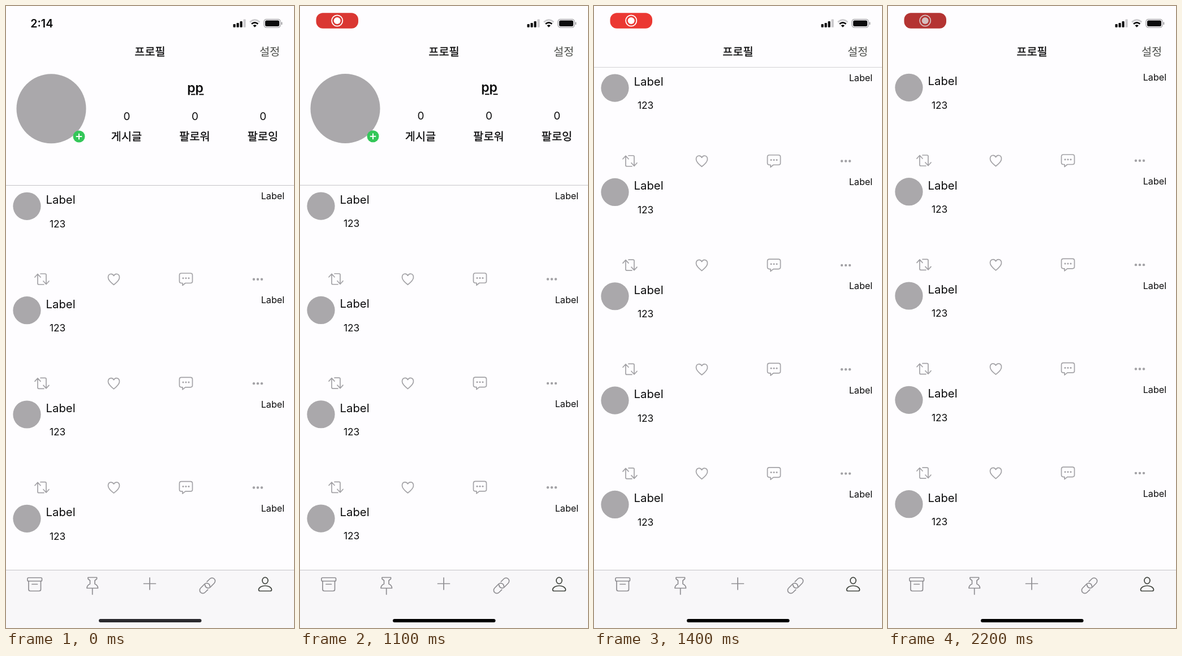
An HTML page for the animation above (2300 ms loop, 509 by 1101 pixels).

```html
<!DOCTYPE html>
<html lang="ko">
<head>
<meta charset="utf-8">
<title>프로필</title>
<style>
html, body { margin: 0; width: 100%; height: 100%; overflow: hidden; background: #fefdff; }
svg { display: block; width: 100vw; height: 100vh; }
text { font-family: Inter, "Liberation Sans", sans-serif; fill: #0c0c0d; }
.ko { font-family: "Noto Sans CJK KR", "Noto Sans CJK", sans-serif; font-size: 19.7px; font-weight: 500; stroke: #0c0c0d; stroke-width: .3; }
.light { font-weight: 400; fill: #4a4c48; stroke: none; }
.mid { text-anchor: middle; }
.line { fill: none; stroke-width: 1.7; stroke-linecap: round; stroke-linejoin: round; }
</style>
</head>
<body>
<svg viewBox="0 0 509 1101">
  <defs>
    <g id="row">
      <circle cx="37" cy="354.3" r="24.6" fill="#aaa8ab"/>
      <text x="70.6" y="350.3" font-size="20.3">Label</text>
      <text x="77" y="391.7" font-size="17.3">123</text>
      <text x="492.2" y="342" font-size="16.2" text-anchor="end">Label</text>
      <g class="line" stroke="#a3a2a6">
        <path d="M51 480l5-5.5 5 5.5M56 475v16q0 2 2 2h9M61 474h8q2 0 2 2v16M66 487l5 5.500 5-5.500"/>
        <path d="M190.500 493.500C184 488.500 180.500 485 180.500 480.500C180.500 473.500 188 472.500 190.500 477.500C193 472.500 200.500 473.500 200.500 480.500C200.500 485 197 488.500 190.500 493.500z"/>
        <path d="M310 473h16q3.500 0 3.500 3.500v10.500q0 3.500-3.500 3.500h-9l-5 4v-4h-2q-3.500 0-3.500-3.500v-10.500q0-3.500 3.500-3.500z"/>
      </g>
      <g fill="#a3a2a6">
        <circle cx="313" cy="481.700" r="1.500"/><circle cx="318" cy="481.700" r="1.500"/><circle cx="323" cy="481.700" r="1.500"/>
        <circle cx="438" cy="483.800" r="2.200"/><circle cx="445" cy="483.800" r="2.200"/><circle cx="452" cy="483.800" r="2.200"/>
      </g>
    </g>
  </defs>

  <rect width="509" height="1101" fill="#fefdff"/>
  <g id="page">
    <circle cx="80" cy="181.800" r="61.500" fill="#aaa8ab"/>
    <circle cx="129" cy="231" r="10.500" fill="#34c759"/>
    <path d="M123.800 231h10.400M129 225.800v10.400" stroke="#fff" stroke-width="2"/>
    <text class="mid" x="334.500" y="152.500" font-size="23" font-weight="600">pp</text>
    <path d="M327 156.500h7.500M341.500 156.500h8" stroke="#0c0c0d" stroke-width="1.800"/>
    <g class="mid" font-size="19">
      <text x="213.500" y="201.500">0</text><text x="334" y="201.500">0</text><text x="454.300" y="201.500">0</text>
      <text class="ko" x="213" y="238">게시글</text><text class="ko" x="333.500" y="238">팔로워</text><text class="ko" x="454" y="238">팔로잉</text>
    </g>
    <path d="M0 317.500h509" stroke="#c4c3c6"/>
    <g id="rows"></g>
  </g>

  <rect width="509" height="108" fill="#fefdff"/>
  <text class="ko mid" x="254.500" y="87.700">프로필</text>
  <text class="ko light mid" x="466" y="87.700">설정</text>

  <text id="clock" class="mid" x="63.300" y="37.500" font-size="19.700" font-weight="600"></text>
  <g id="pill">
    <rect id="pillBg" x="28.500" y="12.300" width="74.500" height="27.400" rx="12"/>
    <circle id="ring" cx="65.700" cy="26" r="9.600" fill="none" stroke-width="1.800"/>
    <circle id="dot" cx="65.700" cy="26" r="6"/>
  </g>

  <g fill="#0c0c0d">
    <rect x="401.500" y="32" width="4.200" height="5.700" rx="1"/>
    <rect x="407.500" y="30" width="4.200" height="7.700" rx="1"/>
    <rect x="413.500" y="27" width="4.200" height="10.700" rx="1"/>
    <rect x="419.500" y="23.500" width="4.200" height="14.200" rx="1" fill="#cbcacd"/>
    <path d="M436.500 34.500q3.200-2.600 6.400 0l-3.200 3.200z"/>
    <rect x="458" y="25.500" width="25" height="10.500" rx="2.500"/>
  </g>
  <g fill="none" stroke-width="2.600">
    <path d="M431 28.500q8.700-7.800 17.400 0" stroke="#cbcacd"/>
    <path d="M434 31.800q5.700-4.800 11.400 0" stroke="#0c0c0d"/>
    <rect x="456" y="23.500" width="29" height="14.500" rx="4.300" stroke="#8d8c90" stroke-width="1.100"/>
    <path d="M487.400 28.500v4.500" stroke="#8d8c90" stroke-width="1.500"/>
  </g>

  <rect y="998" width="509" height="103" fill="#f8f7f9"/>
  <path d="M0 998.500h509" stroke="#c4c3c6"/>
  <g class="line" stroke="#8f8e92">
    <rect x="38" y="1012" width="25.500" height="6" rx="1.800"/>
    <path d="M40 1018v14.500q0 3 3 3h15.500q3 0 3-3v-14.500M46 1023.500h9.500"/>
    <path d="M145 1011.500h15.500v2.500l-3.500 3v6q5.500 2.500 5.500 7.500h-19.500q0-5 5.500-7.500v-6l-3.500-3zM152.700 1030.500v11"/>
    <path d="M243.500 1022.500h21M254 1012v21"/>
    <g transform="translate(356 1026) rotate(-45)">
      <path d="M-4 5.500h-7a5.500 5.500 0 0 1 0-11h10a5.500 5.500 0 0 1 3.500 9.500" transform="translate(-.5 0)"/>
      <path d="M4-5.500h7a5.500 5.500 0 0 1 0 11h-10a5.500 5.500 0 0 1-3.500-9.500" transform="translate(.5 0)"/>
    </g>
    <g stroke="#41453f">
      <ellipse cx="458" cy="1017" rx="5" ry="5.700"/>
      <path d="M449 1035.500q-2.500 0-2.500-2.500c1-9 22-9 23 0q0 2.500-2.500 2.500z"/>
    </g>
  </g>
  <rect id="homeBar" x="164" y="1085" width="181.500" height="6" rx="3"/>
</svg>
<script>
const LOOP = 2300, ROW = 184.35, SCROLL = 210;
const $ = id => document.getElementById(id);
const clamp = v => Math.min(1, Math.max(0, v));
const mix = (a, b, k) => `rgb(${a.map((v, i) => Math.round(v + (b[i] - v) * k))})`;

for (let i = 0; i < 5; i++) {
  $('rows').insertAdjacentHTML('beforeend', `<use href="#row" y="${i * ROW}"/>`);
}

// Cubic ease-in-out with handles at .42 and .58
function ease(x) {
  let lo = 0, hi = 1;
  for (let i = 0; i < 20; i++) {
    const s = (lo + hi) / 2, r = 1 - s;
    if (1.26 * r * r * s + 1.74 * r * s * s + s ** 3 < x) lo = s; else hi = s;
  }
  return lo * lo * (3 - 2 * lo);
}

// Brightness of the recording pill: [ms, level]
const pulse = [[0, .6], [600, .6], [800, .3], [1100, .5], [1200, .55], [1400, .73], [1800, 1], [2200, 0], [2300, 0]];
function glow(t) {
  const i = pulse.findIndex(p => p[0] > t);
  const [t0, a] = pulse[i - 1], [t1, b] = pulse[i];
  return a + (b - a) * (t - t0) / (t1 - t0);
}

function draw(t) {
  const scroll = SCROLL * ease(clamp((t - 1093) / 322));
  $('page').setAttribute('transform', `translate(0 ${-scroll})`);

  const shown = clamp((t - 400) / 200), k = glow(t);
  $('clock').textContent = t < 100 ? '2:14' : '2:15';
  $('clock').setAttribute('opacity', 1 - shown);
  $('pill').setAttribute('opacity', shown);
  $('pillBg').setAttribute('fill', mix([180, 52, 50], [255, 58, 50], k));
  const white = mix([214, 190, 190], [255, 255, 255], clamp(k * 2));
  $('ring').setAttribute('stroke', white);
  $('dot').setAttribute('fill', white);

  $('homeBar').setAttribute('fill', mix([42, 41, 46], [0, 0, 0], clamp(t / 300)));
}

const start = performance.now();
function tick() {
  draw((performance.now() - start) % LOOP);
  requestAnimationFrame(tick);
}
tick();
</script>
</body>
</html>
```
